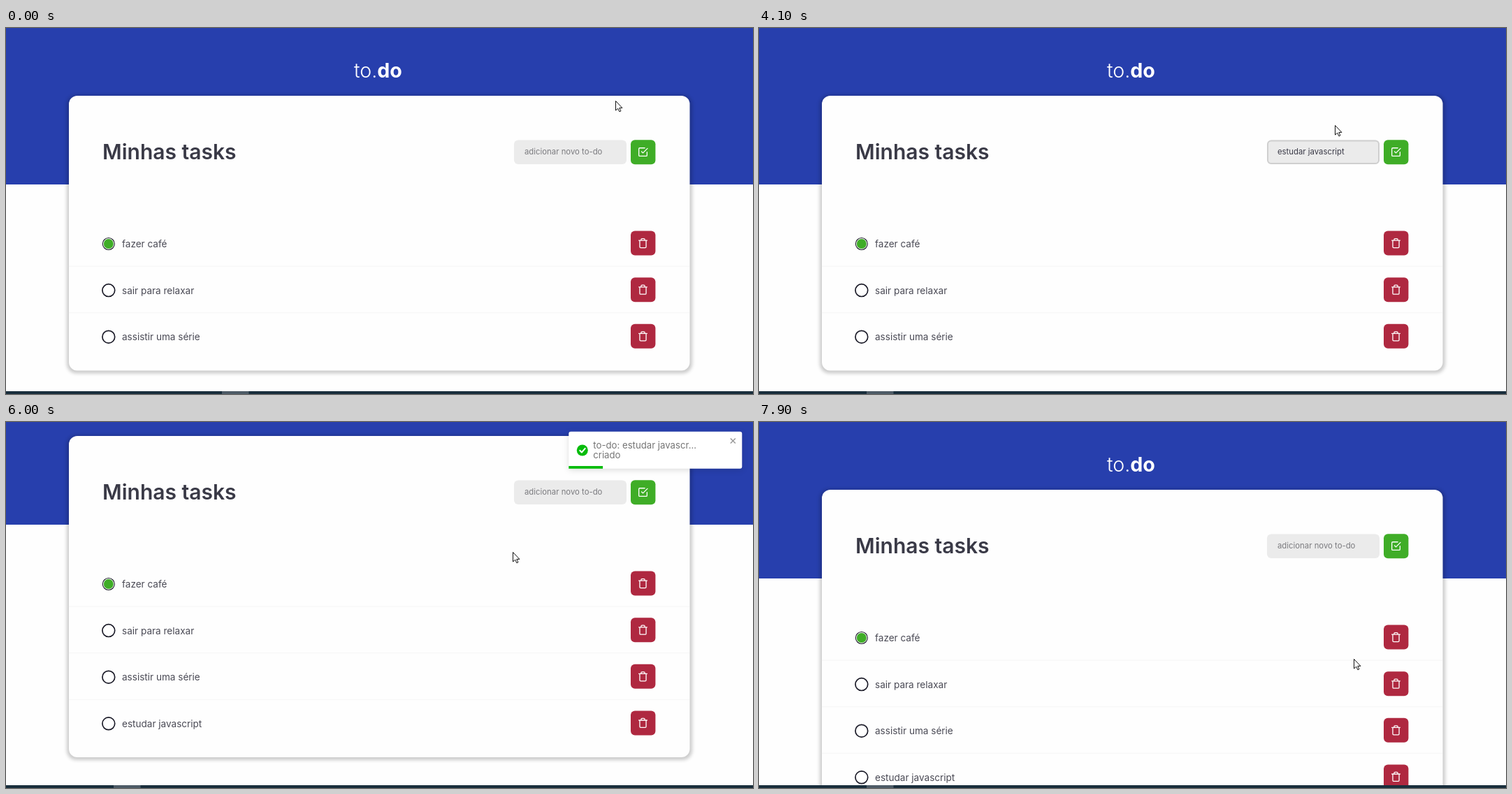
An HTML page for the animation above (8 s loop, 1069 by 524 pixels).

```html
<!DOCTYPE html>
<html lang="pt">
<head>
<meta charset="utf-8">
<title>to.do</title>
<style>
  html, body { margin: 0; width: 100%; height: 100%; overflow: hidden; background: #fefefe; }
  svg { display: block; }
  text { font-family: Inter, "Open Sans", sans-serif; white-space: pre; }
  .icon { fill: none; stroke: #fff; stroke-width: 2; stroke-linecap: round; stroke-linejoin: round; }
  .label { font-size: 13.55px; fill: #4a4a55; }
  #shade { opacity: .2; filter: blur(2.5px); }
  #toast text { font-size: 13.2px; fill: #757575; }
  #toast .panel { fill: #fff; filter: drop-shadow(0 2px 4px #0002); }
</style>
</head>
<body>
<svg width="1069" height="524">
  <defs>
    <path id="check" class="icon" d="M9 11l3 3L22 4M21 12v7a2 2 0 0 1-2 2H5a2 2 0 0 1-2-2V5a2 2 0 0 1 2-2h11"/>
    <path id="trash" class="icon" d="M3 6h18M19 6v14a2 2 0 0 1-2 2H7a2 2 0 0 1-2-2V6M8 6V4a2 2 0 0 1 2-2h4a2 2 0 0 1 2 2v2"/>
  </defs>
  <g id="page">
    <rect width="1069" height="224" fill="#273fad"/>
    <text x="498" y="71" font-size="28.6" font-weight="300" fill="#fff">to.<tspan font-weight="700">do</tspan></text>
    <rect id="shade" x="87" y="96" width="895" rx="14"/>
    <rect id="card" x="90" y="97" width="888.5" rx="12" fill="#fefefe"/>
    <text x="138" y="188" font-size="30" font-weight="600" fill="#3a3a47">Minhas tasks</text>
    <rect x="727" y="160.5" width="161" height="34.5" rx="6" fill="#ebebeb"/>
    <rect id="focus" x="728" y="161.5" width="159" height="32.5" rx="5" fill="none" stroke="#cfcfcf" stroke-width="2"/>
    <text id="field" x="742" y="181" font-size="11.35"></text>
    <rect id="add" x="894" y="160.2" width="35.4" height="35" rx="6"/>
    <use href="#check" transform="translate(903.7 169.8) scale(.65)"/>
    <g id="rows"></g>
  </g>
  <rect y="520" width="1069" height="4" fill="#192e3c"/>
  <rect id="tab" y="520" width="38.5" height="4" fill="#4d5b66"/>
  <g id="toast">
    <rect class="panel" y="13.8" width="248" height="53" rx="3"/>
    <circle cx="19.5" cy="40.5" r="8" fill="#07bc0c"/>
    <path class="icon" d="M16 40.8l2.6 2.7 4.8-5.6"/>
    <text x="35" y="38">to-do: estudar javascr...</text>
    <text x="35" y="52">criado</text>
    <path d="M231.5 23.5l7 7m0-7l-7 7" stroke="#999" stroke-width="1.5"/>
    <rect id="bar" y="63" height="3.8" fill="#07bc0c"/>
  </g>
  <g id="pointer" fill="#fff" stroke="#111" stroke-linejoin="round">
    <path id="arrow" d="M.5 .5V14l3.2-2.8 2.2 4.6 2-.9-2.1-4.5h4.1z"/>
    <path id="beam" fill="none" d="M-2.5-6.5h2l1 1 1-1h2M.5-5.5v11M-2.5 6.5h2l1-1 1 1h2"/>
    <path id="hand" d="M-1 9V1Q0-1 1.3 1V6Q2.600 4.700 3.700 6.200 5 5 6 6.700 7.600 6 8 8v4l-1.500 3v2.500H0v-2L-4 10Q-4 8-1 9z"/>
  </g>
</svg>
<script>
const LOOP = 8000, STEP = 100, CREATED = 4600, TOAST_IN = 4516, TOAST_OUT = 6360;
const TASK = 'estudar javascript';
// time, letters typed
const TYPING = [[500, 0], [900, 2], [1200, 3], [1900, 10], [2300, 12], [2800, 13], [3500, 18]];
// time, x, y
const POINTER = [
  [0, 872, 104], [500, 780, 174], [3800, 780, 174], [4100, 824, 139], [4200, 878, 135],
  [4500, 899, 171], [4800, 899, 171], [5200, 882, 173], [5700, 747, 177], [6000, 725, 186],
  [6800, 725, 186], [7200, 552, 237], [7600, 695, 238], [7900, 851, 339]];
// share of the entrance, shift
const BOUNCE = [[0, 3000], [.6, -25], [.75, 10], [.9, -5], [1, 0]];

const $ = id => document.getElementById(id);
const set = (id, name, value) => $(id).setAttribute(name, value);
const show = (id, on) => set(id, 'visibility', on ? 'visible' : 'hidden');
const clamp = v => Math.max(0, Math.min(1, v));
const easeOut = k => 1 - (1 - k) ** 2.78;
const smooth = (t, from, to) => {
  const k = clamp((t - from) / (to - from));
  return k * k * (3 - 2 * k);
};

// values between two key points, held before the first and after the last
function track(keys, t, ease = k => k) {
  const next = Math.max(1, keys.findIndex(key => key[0] > t));
  const i = t >= keys[keys.length - 1][0] ? keys.length - 1 : next;
  const a = keys[i - 1], b = keys[i];
  const k = ease(clamp((t - a[0]) / (b[0] - a[0])));
  return a.slice(1).map((v, j) => v + (b[j + 1] - v) * k);
}

$('rows').innerHTML = ['fazer café', 'sair para relaxar', 'assistir uma série', TASK].map((name, i) => `
  <g id="row${i}" transform="translate(0 ${i * 66.6})">
    ${i ? '<path d="M90 274.5H978" stroke="#f5f5f5"/>' : ''}
    <circle cx="146.8" cy="309" r="${i ? 8.9 : 8.5}" fill="#fff" stroke="#1b1b28" stroke-width="${i ? 1.7 : 1.1}"/>
    ${i ? '' : '<circle cx="146.8" cy="309" r="7" fill="#3fad27"/>'}
    <text class="label" x="166" y="314.3">${name}</text>
    <rect x="894" y="290.6" width="35.4" height="35" rx="6" fill="#af2840"/>
    <use href="#trash" transform="translate(903.7 300.3) scale(.65)"/>
  </g>`).join('');

function toastShift(t) {
  const away = (t - TOAST_OUT) / 700;
  return track(BOUNCE, (t - TOAST_IN) / 700, easeOut)[0]
    - 16 * smooth(away, 0, .2) + 1600 * smooth(away, .2, .9);
}

function draw(t) {
  const scroll = Math.round(77 * (smooth(t, 4850, 5170) - smooth(t, 7580, 7880)));
  const created = t >= CREATED;
  const height = created ? 460 : 393.5;
  set('page', 'transform', `translate(0 ${-scroll})`);
  set('card', 'height', height);
  set('shade', 'height', height + 5);
  show('row3', created);
  set('tab', 'x', t < 200 ? 309 : 154);

  const count = created ? 0 : Math.floor(track(TYPING, t)[0] + 1e-6);
  $('field').textContent = count ? TASK.slice(0, count) : 'adicionar novo to-do';
  set('field', 'fill', count ? '#3a3a47' : '#7b7b7f');
  show('focus', t >= 500 && t < 4500);

  const [x, y] = track(POINTER, t);
  const inBar = y + scroll > 160 && y + scroll < 195;
  const onField = inBar && x > 727 && x < 888;
  const onAdd = inBar && x > 894 && x < 929;
  set('pointer', 'transform', `translate(${x} ${y})`);
  show('arrow', !onField && !onAdd);
  show('beam', onField);
  show('hand', onAdd);
  set('add', 'fill', onAdd ? '#65bd52' : '#3fad27');

  set('toast', 'transform', `translate(${805.3 + toastShift(t)} 0)`);
  set('toast', 'opacity', easeOut(clamp((t - TOAST_IN) / 420)));
  set('bar', 'width', 248 * clamp((TOAST_OUT - t) / 1830));
}

const start = performance.now();
function tick() {
  const t = (performance.now() - start) % LOOP;
  draw(Math.floor(t / STEP) * STEP);
  requestAnimationFrame(tick);
}
tick();
</script>
</body>
</html>
```
